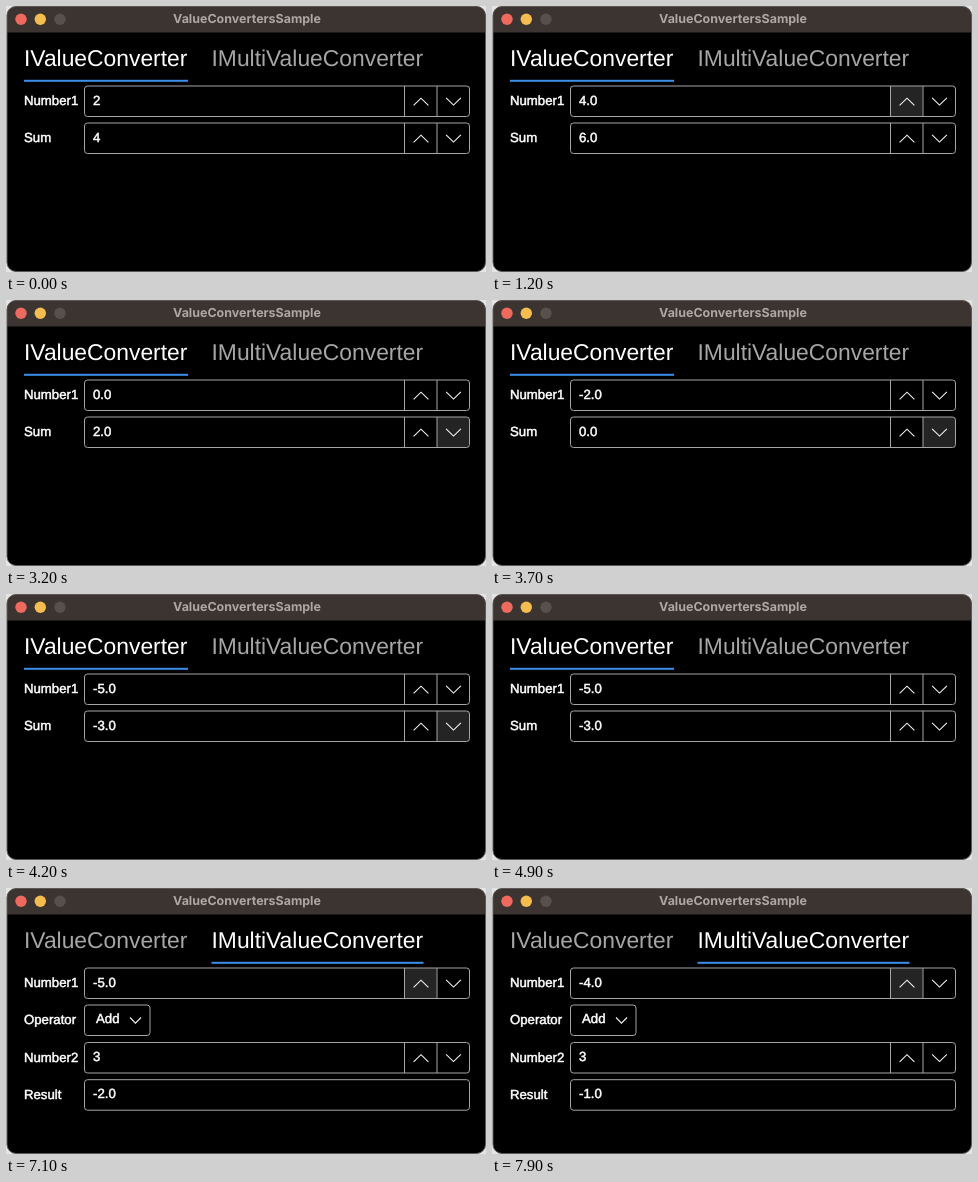
Recreate the animation shown at these times as an HTML page. Size 480 by 266 pixels, loop 8000 ms.

```html
<!DOCTYPE html>
<html lang="en">
<head>
<meta charset="utf-8">
<title>ValueConvertersSample</title>
<style>
  html, body { margin: 0; width: 100%; height: 100%; overflow: hidden; background: #e4e4e4; }
  svg { display: block; width: 480px; height: 266px; }
  text { font: 13.2px "Liberation Sans", Arial, sans-serif; fill: #fff; stroke: #fff; stroke-width: .5; text-rendering: geometricPrecision; }
  .title { font: 700 12.45px Inter, sans-serif; fill: #aea7a4; stroke: none; text-anchor: middle; }
  .tab { font-size: 22.85px; fill: #a6a6a6; stroke: none; }
  .tab.on { fill: #fff; }
  .frame { fill: none; stroke: #a6a6a6; }
  .chevron { fill: none; stroke: #f4f4f4; stroke-width: 1.1; }
  .hover { fill: #242424; }
</style>
</head>
<body>
<svg viewBox="0 0 480 266">
  <rect x="1" y=".5" width="478.5" height="265" rx="9"/>
  <path d="M1 26.5V9.5a9 9 0 0 1 9-9H470.5a9 9 0 0 1 9 9V26.5Z" fill="#3b3431"/>
  <rect x="1" y=".5" width="478.5" height="265" rx="9" fill="none" stroke="#5c5856"/>
  <circle cx="15" cy="13.3" r="5.7" fill="#ee6a5f"/>
  <circle cx="34.3" cy="13.3" r="5.7" fill="#f5bd4f"/>
  <circle cx="54" cy="13.3" r="5.7" fill="#58504d"/>
  <text class="title" x="241" y="17.2">ValueConvertersSample</text>
  <text class="tab" x="18" y="60">IValueConverter</text>
  <text class="tab" x="205.5" y="60">IMultiValueConverter</text>
  <rect id="underline" y="73.8" height="2" fill="#3b8fe8"/>
  <g id="page"></g>
</svg>
<script>
const LOOP = 8000;
const page = document.getElementById('page');
const underline = document.getElementById('underline');
const tabs = document.querySelectorAll('.tab');

const clamp = (v, lo, hi) => Math.min(hi, Math.max(lo, v));
// Number of clicks made so far in an evenly spaced run
const clicks = (t, start, gap, count) => clamp(Math.floor((t - start) / gap) + 1, 0, count);

const chevron = (x, y, w, h) => `<path class="chevron" d="M${x - w} ${y - h}L${x} ${y + h}L${x + w} ${y - h}"/>`;
const box = (y, w) => `<rect class="frame" x="78.5" y="${y}" width="${w}" height="30.5" rx="3"/>`;
const label = (y, name, value, x = 87) =>
  `<text x="18" y="${y + 19}">${name}</text><text x="${x}" y="${y + 18.5}">${value}</text>`;

function spinner(y, name, value, hover) {
  const lit = hover ? `<rect class="hover" x="${hover === 'up' ? 398.5 : 431}" y="${y}" width="32" height="30.5" rx="1"/>` : '';
  return lit + box(y, 385) + label(y, name, value) +
    `<path class="frame" d="M398.5 ${y}v30.5M431 ${y}v30.5"/>` +
    chevron(415, y + 15.8, 7.4, -3.6) + chevron(447.5, y + 15.5, 7.4, 3.6);
}

function converterPage(t) {
  const ups = clicks(t, 800, 300, 3);
  const number = 2 + ups - clicks(t, 2400, 200, 10);
  const show = n => ups ? n.toFixed(1) : n;
  return spinner(80, 'Number1', show(number), t >= 200 && t < 1700 && 'up') +
    spinner(117, 'Sum', show(number + 2), t >= 1700 && t < 4500 && 'down');
}

function multiPage(t) {
  const number = -5 + clicks(t, 7700, 300, 1);
  return spinner(80, 'Number1', number.toFixed(1), t >= 6900 && 'up') +
    box(117, 65.5) + label(116.8, 'Operator', 'Add', 90) + chevron(129.5, 132.3, 5.5, 2.8) +
    spinner(154.5, 'Number2', 3) +
    box(191.7, 385) + label(191.7, 'Result', (number + 3).toFixed(1));
}

let shown;
function draw(now) {
  const t = now % LOOP;
  const multi = t >= 5400;
  const markup = multi ? multiPage(t) : converterPage(t);
  if (markup !== shown) {
    page.innerHTML = shown = markup;
    tabs[0].classList.toggle('on', !multi);
    tabs[1].classList.toggle('on', multi);
    underline.setAttribute('x', multi ? 205.5 : 18);
    underline.setAttribute('width', multi ? 212 : 164);
  }
  requestAnimationFrame(draw);
}
draw(0);
</script>
</body>
</html>
```
